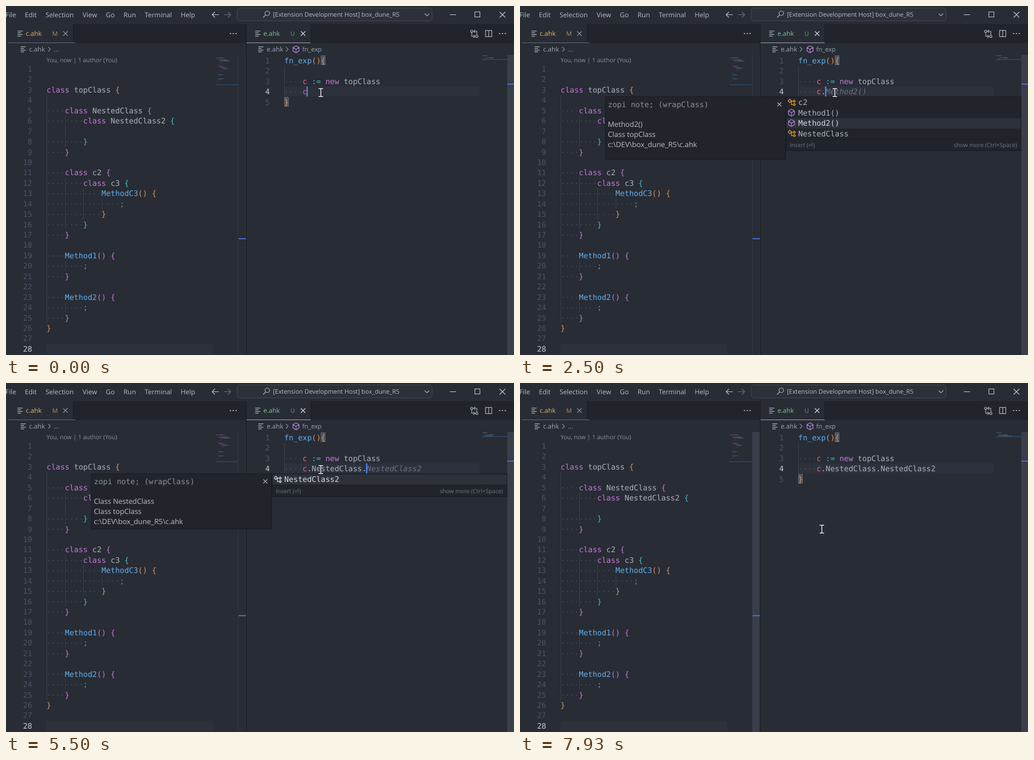
Write an HTML page with a canvas that moves like this. It is 902 by 621 pixels and loops after 8000 ms.

```html
<!DOCTYPE html>
<html lang="en">
<head>
<meta charset="utf-8">
<title>Editor completion</title>
<style>
html, body { margin: 0; width: 100%; height: 100%; overflow: hidden; background: #282c34; }
canvas { display: block; }
</style>
</head>
<body>
<canvas id="stage" width="902" height="621"></canvas>
<script>
const g = document.getElementById('stage').getContext('2d');
const LOOP = 8000, CW = 8.13, LH = 18.44, MAP_CW = .94, MAP_LH = 1.87;
const MONO = '"DejaVu Sans Mono", monospace', SANS = '"Open Sans", "Noto Sans", sans-serif';
const BG = '#282c34', DARK = '#21252b', LINE = '#181a1f', GREY = '#abb2bf', LIGHT = '#c5cad3', DIM = '#6f7580';
const MARK = '#4470c8';
const INK = { p: '#c678dd', t: GREY, o: '#d8975f', c: '#4fb8c4', b: '#61afef', g: '#7f848e', r: '#e06c75' };

// Each line: indent, then ^colour-key followed by text
const LEFT = ['', '', '0^pclass^t topClass ^o{', '',
  '4^pclass^t NestedClass ^p{', '8^pclass^t NestedClass2 ^c{', '', '8^c}', '4^p}', '',
  '4^pclass^t c2 ^p{', '8^pclass^t c3 ^c{', '12^bMethodC3^o() {', '16^g;', '12^o}', '8^c}', '4^p}', '',
  '4^bMethod1^p() {', '8^g;', '4^p}', '', '4^bMethod2^p() {', '8^g;', '4^p}', '0^o}', '', ''];
const MEMBERS = ['c2', 'Method1()', 'Method2()', 'NestedClass'];
const PATH = 'c:\\DEV\\box_dune_R5\\c.ahk';

// text appears at `at`, the caret starts to follow at `glide` and blinks from `blink`
const EDITS = [
  { at: 0, glide: 0, blink: -170, text: '' },
  { at: 1250, glide: 1250, blink: 1330, text: '.' },
  { at: 3410, glide: 3570, blink: 3670, text: '.NestedClass' },
  { at: 4130, glide: 4130, blink: 4470, text: '.NestedClass.' },
  { at: 6080, glide: 6360, blink: 6410, text: '.NestedClass.NestedClass2' },
];

const lerp = (a, b, k) => a + (b - a) * k;
const progress = (t, from, to) => Math.min(1, Math.max(0, (t - from) / (to - from)));

function rect(x, y, w, h, color) {
  g.fillStyle = color;
  g.fillRect(x, y, w, h);
}
function stroke(color, width, ...lines) {
  g.strokeStyle = color;
  g.lineWidth = width;
  g.beginPath();
  for (const p of lines)
    for (let i = 0; i < p.length; i += 2) g[i ? 'lineTo' : 'moveTo'](p[i], p[i + 1]);
  g.stroke();
}
function box(x, y, w, h, color, width = 1) {
  g.strokeStyle = color;
  g.lineWidth = width;
  g.strokeRect(x, y, w, h);
}
function ring(x, y, r, color) {
  g.beginPath();
  g.arc(x, y, r, 0, 7);
  g.strokeStyle = color;
  g.lineWidth = 1.2;
  g.stroke();
}
function write(s, x, y, color, font, align = 'left') {
  g.font = font;
  g.textAlign = align;
  g.fillStyle = color;
  g.fillText(s, x, y);
  return g.measureText(s).width;
}
const ui = (s, x, y, color = GREY, size = 11.6, align) =>
  write(s, x, y + size * .36, color, `${size}px ${SANS}`, align);
const mono = (s, x, y, color, style = '', align) =>
  write(s, x, y + 5, color, `${style} 13.5px ${MONO}`, align);

function dots(x, y) {
  for (let i = -1; i < 2; i++) rect(x + i * 5 - 1, y - 1, 2, 2, GREY);
}
function cross(x, y, r, color) {
  stroke(color, 1.1, [x - r, y - r, x + r, y + r], [x - r, y + r, x + r, y - r]);
}
function fileIcon(x, y) {
  for (let i = 0; i < 4; i++) rect(x, y - 5 + i * 3, 9 - i % 2 * 3, 1.2, GREY);
}
function arrow(x, y, dir, color, r = 6) {
  const tip = x + dir * r, back = tip - dir * r * .83;
  stroke(color, 1.2, [x - dir * r, y, tip, y], [back, y - r * .83, tip, y, back, y + r * .83]);
}
function cube(x, y) {
  const corner = i => [x + 6.2 * Math.sin(i * Math.PI / 3), y - 6.2 * Math.cos(i * Math.PI / 3)];
  const hexagon = [0, 1, 2, 3, 4, 5, 6].flatMap(corner);
  stroke('#b180d7', 1.2, hexagon, ...[1, 3, 5].map(i => [x, y, ...corner(i)]));
}
function diamond(x, y, r, color) {
  stroke(color, 1.3, [x - r, y, x, y - r, x + r, y, x, y + r, x - r, y]);
}
function classIcon(x, y, color) {
  diamond(x - 3, y - 2.5, 3, color);
  stroke(color, 1.2, [x, y - 2, x + 3, y - 2], [x, y - 2, x, y + 4, x + 3, y + 4]);
  diamond(x + 5, y - 2, 2, color);
  diamond(x + 5, y + 4, 2, color);
}

function titleBar() {
  let x = -1;
  for (const name of ['File', 'Edit', 'Selection', 'View', 'Go', 'Run', 'Terminal', 'Help'])
    x += ui(name, x, 15.5, '#b6bcc7', 11.9) + 15.6;
  arrow(372, 15.5, -1, '#b6bcc7');
  arrow(393, 15.5, 1, '#666c78');
  g.beginPath();
  g.roundRect(410.5, 3.5, 346, 23, 5);
  g.fillStyle = '#2c3039';
  g.fill();
  g.strokeStyle = '#434852';
  g.lineWidth = 1;
  g.stroke();
  ring(464, 13, 4, GREY);
  stroke(GREY, 1.2, [461, 16, 456.5, 20.5]);
  ui('[Extension Development Host] box_dune_R5', 474, 15.5, '#b6bcc7', 10.9);
  stroke(GREY, 1.1, [743.5, 13.5, 747.5, 17.5, 751.5, 13.5]);
  rect(788, 15, 11, 1, LIGHT);
  box(832.5, 10.5, 9, 9, LIGHT);
  cross(881.5, 15.5, 5, LIGHT);
}

function tab(x, width, name, color, status, active) {
  rect(x, 32, width, 34, BG);
  rect(x + width, 32, 1, 34, LINE);
  rect(Math.max(x, 4), 65, width, 1, active ? '#9da5a8' : '#626873');
  const right = x + width;
  fileIcon(right - 98.5, 49);
  ui(name, right - 84, 49, color);
  g.globalAlpha = .75;
  ui(status, right - 32, 49, color, 10.6, 'center');
  g.globalAlpha = 1;
  cross(right - 13.5, 49, 4, active ? '#d7dae0' : '#8b919d');
  // breadcrumb
  const left = right - 93;
  fileIcon(left, 77);
  ui(name, left + 15, 77, '#9da5b4');
  stroke('#8b919d', 1.1, [left + 49, 73, left + 53, 77, left + 49, 81]);
}

function tabs() {
  rect(0, 32, 902, 34, DARK);
  tab(0, 119, 'c.ahk', '#e5b567', 'M', false);
  tab(427, 114, 'e.ahk', '#73c991', 'U', true);
  ui('...', 85, 77, '#9da5b4');
  cube(515, 77);
  ui('fn_exp', 526, 77, '#9da5b4', 11.2);
  dots(403.5, 49);
  dots(881.5, 49);
  // compare and split buttons
  for (const s of [-1, 1]) {
    const x = 831.5 + s * 4.5, y = 49.5 + s * 4.5;
    ring(x, y, 2, GREY);
    stroke(GREY, 1.2, [x, y - s * 2, x, y - s * 9, x - s * 5, y - s * 9]);
    stroke(GREY, 1.2, [x - s * 3, y - s * 9 - 2.5, x - s * 5.5, y - s * 9, x - s * 3, y - s * 9 + 2.5]);
  }
  box(851.5, 43.5, 11, 11, GREY, 1.2);
  rect(856.5, 43.5, 1.2, 11, GREY);
}

const indentOf = line => line && parseInt(line);

// A blank line takes its guides from the code around it
function guideDepth(lines, i) {
  if (lines[i]) return indentOf(lines[i]);
  const above = indentOf(lines.slice(0, i).findLast(Boolean)) ?? 0;
  const below = indentOf(lines.slice(i).find(Boolean)) ?? 0;
  return above === below ? above : Math.min(above, below) + 4;
}

function codeLine(line, x, y, mapX, mapY) {
  const [indent, ...parts] = line.split('^');
  let col = +indent;
  for (let i = 0; i < col; i++) rect(x + (i + .5) * CW - .8, y, 1.6, 1.6, '#4b515d');
  for (const part of parts) {
    const s = part.slice(1), color = INK[part[0]];
    mono(s, x + col * CW, y, color);
    g.globalAlpha = .5;
    [...s].forEach((ch, i) => ch !== ' ' && rect(mapX + (col + i) * MAP_CW, mapY, .85, 1.1, color));
    g.globalAlpha = 1;
    col += s.length;
  }
}

function editor(lines, x, top, mapX, current, firstGuide) {
  lines.forEach((line, i) => {
    const y = top + i * LH;
    if (i >= firstGuide)
      for (let col = 0; col < guideDepth(lines, i); col += 4)
        rect(Math.round(x + col * CW), y - LH / 2, 1, LH, '#3b4049');
    mono(i + 1, x - 25.5, y, i === current ? LIGHT : '#4b5263', '', 'right');
    codeLine(line, x, y, mapX, 88 + i * MAP_LH);
  });
  rect(mapX - 1, 89 + current * MAP_LH, 45, 1.2, '#2d5279');
}

function leftEditor(t) {
  rect(72, 601, 296, 18, '#2c313c');
  ui('You, now | 1 author (You)', 72, 96, '#8a909b', 10.6);
  editor(LEFT, 72, 112, 373, 27, 3);
  rect(412, 87, 14, 534, BG);
  rect(413, 87, 13, 534, `rgba(78, 86, 102, ${.45 * progress(t, 7150, 7300)})`);
  rect(412, 87, 1, 534, '#343941');
  rect(425, 87, 1, 534, '#30353d');
  rect(413, 413, 13, 2, MARK);
  rect(426, 32, 1, 589, LINE);
}

function rightEditor(typed, ghost) {
  rect(494, 143, 347, 18, '#2c313c');
  for (const [col, row] of [[8, 0], [0, 4]]) {
    const x = Math.round(494 + col * CW), y = Math.round(88 + row * LH);
    rect(x, y, 8, 17, '#4c535f');
    box(x + .5, y + .5, 7, 16, '#636a77');
  }
  const lines = ['0^bfn_exp^o(){', '', '4^rc^c :=^p new^t topClass', '4^rc^t' + typed, '0^o}'];
  editor(lines, 494, 97, 846, 3, 1);
  mono(ghost, 494 + (5 + typed.length) * CW, 97 + 3 * LH, '#6b717d', 'italic');
  rect(890, 87, 12, 534, '#393e48');
  rect(890, 138, 12, 2, MARK);
}

function caret(t) {
  const n = EDITS.findLastIndex(e => e.glide <= t);
  const now = EDITS[n], before = EDITS[Math.max(0, n - 1)];
  if (Math.floor(Math.max(0, t - now.blink) / 500) % 2) return;
  const ease = 1 - (1 - progress(t, now.glide, now.glide + 110)) ** 2;
  const col = 5 + lerp(before.text.length, now.text.length, ease);
  rect(494 + col * CW - 1, 143, 2, 18, '#528bff');
}

function panel(x, y, w, h) {
  rect(x, y, w, h, DARK);
  box(x + .5, y + .5, w - 1, h - 1, LINE);
}
function suggestions(items, selected) {
  const end = 162 + items.length * LH;
  panel(472, 161, 418, end - 139);
  rect(473, 162.5 + selected * LH, 416, LH, '#2c313a');
  items.forEach((s, i) => {
    const y = 171.3 + i * LH;
    if (s.endsWith('()')) cube(482, y);
    else classIcon(482, y, i === selected ? '#d7dae0' : '#ee9d28');
    mono(s, 494, y, i === selected ? '#d7dae0' : GREY);
  });
  rect(473, end + 1, 416, 1, '#1b1e23');
  ui('Insert (\u23ce)', 479, end + 12, DIM, 10.2);
  ui('show more (Ctrl+Space)', 882.5, end + 12, DIM, 10.2, 'right');
}
function details(lines, extra = 0) {
  panel(151, 161, 321, 44 + lines.length * LH + extra);
  mono('zopi note; (wrapClass)', 156, 175, '#8a909b');
  cross(460.5, 175, 3.5, GREY);
  lines.forEach((s, i) => ui(s, 156, 210 + i * LH, '#b9bfca', 12.8));
}

function mouse(t) {
  const out = progress(t, 6750, 7410), back = progress(t, 7570, 7930);
  const x = lerp(lerp(559, 268, out ** 1.4), 536, back);
  const y = lerp(lerp(154, 258, out), 260, back);
  if (x > 412 && x < 490) {
    const arrowHead = new Path2D('M0 0V16L3.7 12.6L6.2 18L8.6 17L6.2 11.6L11 11.2Z');
    g.save();
    g.translate(x, y);
    g.fillStyle = '#fff';
    g.fill(arrowHead);
    g.strokeStyle = '#15171b';
    g.lineWidth = .8;
    g.stroke(arrowHead);
    g.restore();
  } else {
    const beam = [[x, y - 7, x, y + 7], ...[-7, 7].map(d => [x - 4, y + d, x + 4, y + d])];
    stroke('#111318', 3, ...beam);
    stroke('#f2f2f2', 1.5, ...beam);
  }
}

function draw(t) {
  rect(0, 0, 902, 621, BG);
  const typed = EDITS.findLast(e => e.at <= t).text;
  const members = typed === '.' && t >= 1290, nested = typed.endsWith('s.');
  const ready = members ? t >= 1330 : nested && t >= 4170;
  const pick = [2370, 2500, 2750].filter(press => press <= t).length;
  const choice = members ? MEMBERS[pick] : 'NestedClass2';
  titleBar();
  tabs();
  leftEditor(t);
  rightEditor(typed, ready ? choice : '');
  caret(t);
  if (members) suggestions(MEMBERS, pick);
  if (nested) suggestions([choice], 0);
  if (ready) {
    const method = choice.endsWith('()');
    const owner = nested ? ['Class NestedClass'] : method ? [choice] : [];
    details([...owner, 'Class topClass', PATH], method ? 13 : 0);
  }
  mouse(t);
}

g.textRendering = 'geometricPrecision';
const start = performance.now();
function tick() {
  draw((performance.now() - start) % LOOP);
  requestAnimationFrame(tick);
}
tick();
</script>
</body>
</html>
```
